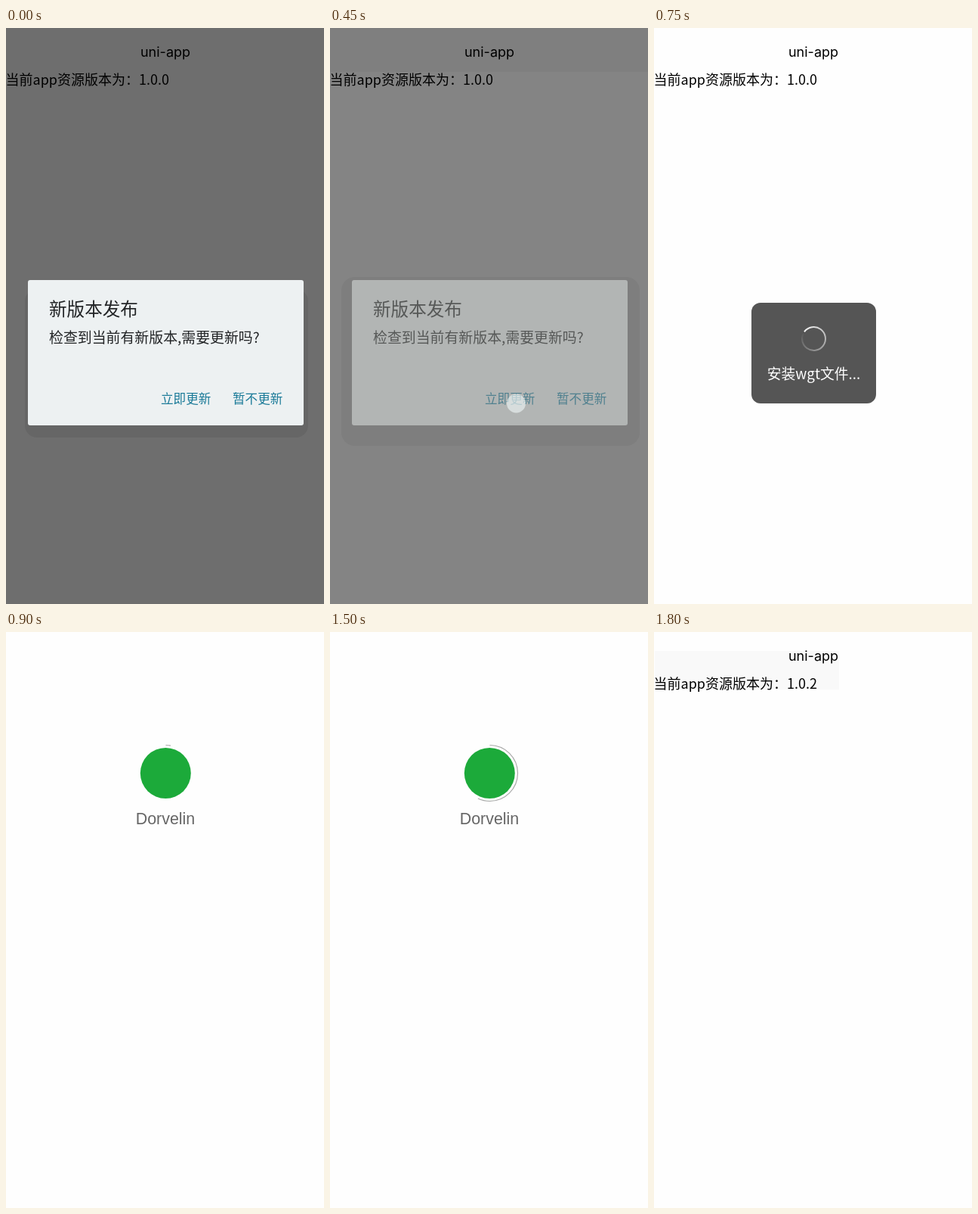
Write an HTML page with a canvas that moves like this. It is 421 px wide and 761 px high and loops after 3.75 s.

```html
<!DOCTYPE html>
<html lang="zh-CN">
<head>
<meta charset="utf-8">
<title>App update</title>
<style>
  html, body { margin: 0; width: 100%; height: 100%; overflow: hidden; background: #fefefe; }
  canvas { display: block; }
</style>
</head>
<body>
<canvas id="stage" width="421" height="761"></canvas>
<script>
const ctx = document.getElementById('stage').getContext('2d');
const LOOP = 3750, STEP = 150, TAU = Math.PI * 2;
const CJK = '"Noto Sans CJK SC", "Noto Sans CJK", sans-serif';
const OPEN = { page: '#6e6e6e', bar: '#6e6e6e', card: '#edf1f2', text: '#222426', link: '#1a7a98',
               shadow: '#666', shadowBox: [25, 345, 375, 196, 16] };
const FADING = { page: '#848484', bar: '#7f7f7f', card: '#b2b5b4', text: '#565857', link: '#50808f',
                 shadow: '#7e7e7e', shadowBox: [15, 329, 395, 223, 18] };
const ARC_ENDS = [10, 55, 115, 163, 205]; // splash progress in degrees, one per step

function rect(color, x, y, w, h, r = 0) {
  ctx.fillStyle = color;
  ctx.beginPath();
  ctx.roundRect(x, y, w, h, r);
  ctx.fill();
}

function disc(color, x, y, r) {
  ctx.fillStyle = color;
  ctx.beginPath();
  ctx.arc(x, y, r, 0, TAU);
  ctx.fill();
}

function arc(color, width, x, y, r, from = 0, to = TAU) {
  ctx.strokeStyle = color;
  ctx.lineWidth = width;
  ctx.beginPath();
  ctx.arc(x, y, r, from, to);
  ctx.stroke();
}

function text(str, x, y, size, color, { align = 'left', family = CJK } = {}) {
  ctx.font = `${size}px ${family}`;
  ctx.textAlign = align;
  ctx.fillStyle = color;
  ctx.fillText(str, x, y);
}

function pageText(version) {
  text('uni-app', 211, 38, 18, '#000', { align: 'center', family: 'Inter, sans-serif' });
  text('当前app资源版本为：' + version, -0.5, 75, 18, '#000');
}

function dialog(look) {
  rect(look.page, 0, 0, 421, 761);
  rect(look.bar, 0, 0, 421, 58);
  pageText('1.0.0');
  rect(look.shadow, ...look.shadowBox);
  rect(look.card, 29, 333, 365, 192, 3);
  text('新版本发布', 57, 380, 23.6, look.text);
  text('检查到当前有新版本,需要更新吗?', 57, 416, 18.9, look.text);
  text('立即更新', 205, 496, 16.6, look.link);
  text('暂不更新', 300, 496, 16.6, look.link);
}

function touch(fading) {
  disc(fading ? 'rgba(235,242,243,.65)' : 'rgba(240,245,246,.65)', 246.5, 496, 12.5);
  if (!fading) arc('#c9cdce', 1.5, 246.5, 496, 13);
}

function waiting(message, head) {
  rect('#555', 129, 363, 165, 133, 12);
  const fade = ctx.createConicGradient(head, 211.5, 410.5);
  fade.addColorStop(0, 'rgba(255,255,255,.95)');
  fade.addColorStop(.9, 'rgba(255,255,255,.1)');
  fade.addColorStop(1, 'rgba(255,255,255,0)');
  arc(fade, 2, 211.5, 410.5, 15.5, head, head + TAU * .97);
  text(message, 211.5, 464, 18.8, '#fff', { align: 'center' });
}

function splash(degrees) {
  const top = -TAU / 4;
  arc('#a8a8a8', 1.2, 211.5, 186.5, 37, top, top + degrees / 360 * TAU);
  disc('#1caa3a', 211.3, 186.5, 33.5);
  text('Dorvelin', 211, 254, 21.4, '#666',
    { align: 'center', family: '"Liberation Sans", Arial, sans-serif' });
}

function draw(time) {
  const step = Math.floor(time % LOOP / STEP);
  rect('#fefefe', 0, 0, 421, 761);
  if (step < 4) {
    const fading = step === 3;
    dialog(fading ? FADING : OPEN);
    if (step > 1) touch(fading);
  } else if (step < 6) {
    pageText('1.0.0');
    if (step === 4) waiting('正在下载', TAU * .19);
    else waiting('安装wgt文件...', TAU * .6);
  } else if (step < 11) {
    splash(ARC_ENDS[step - 6]);
  } else {
    rect('#f9f9f9', 1, 25, 244, 51);
    pageText('1.0.2');
  }
}

const start = performance.now();
function tick() {
  draw(performance.now() - start);
  requestAnimationFrame(tick);
}
tick();
</script>
</body>
</html>
```
